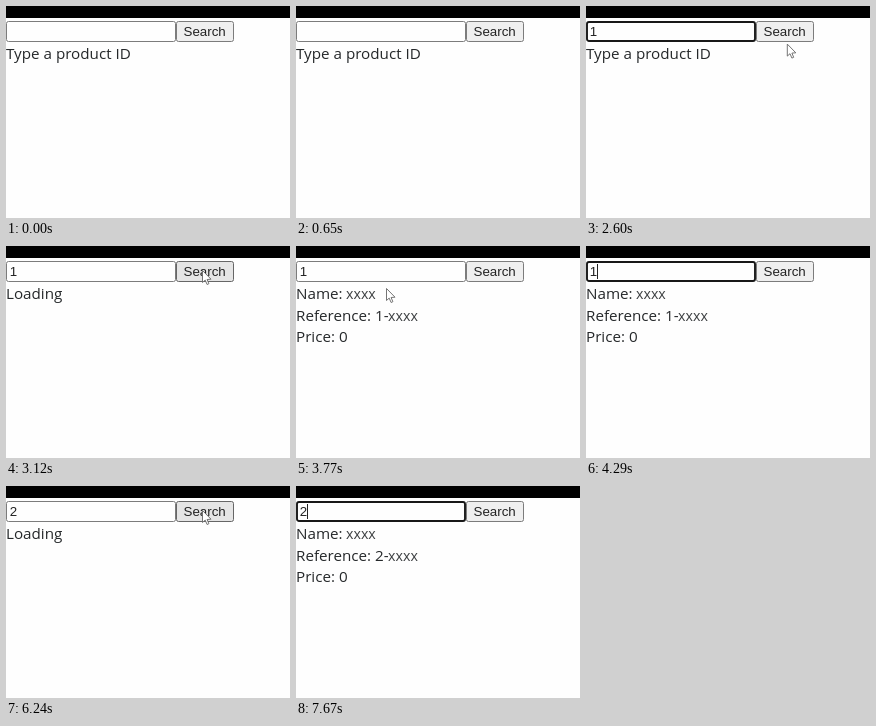
Recreate the animation shown at these times as an HTML page with a canvas. Size 284x212 px, loop 8000 ms.

```html
<!DOCTYPE html>
<html lang="en">
<head>
<meta charset="utf-8">
<title>Product search</title>
<style>
  html, body { margin: 0; width: 100%; height: 100%; overflow: hidden; background: #fefefe; }
  canvas { display: block; width: 284px; height: 212px; }
</style>
</head>
<body>
<canvas id="stage"></canvas>
<script>
const W = 284, H = 212, LOOP = 8000, STEP = 130;
const LOAD = 520, BLINK = 520, APPROACH = 650, CLEAR = 390;
const canvas = document.getElementById('stage');
const dpr = window.devicePixelRatio || 1;
canvas.width = W * dpr;
canvas.height = H * dpr;
const ctx = canvas.getContext('2d');

const PAGE_FONT = '15.2px "Open Sans", sans-serif';
const VALUE_FONT = '14.2px "Open Sans", sans-serif';
const FORM_FONT = '13.333px "Liberation Sans", Arial, sans-serif';
const INK = '#25282a', FORM_INK = '#222', BORDER = '#7c7c7c';

const point = (x, y) => ({ x, y });
const TARGET = point(196, 24), FIELD = point(50, 30);

// The last visit only focuses the field
const searches = [
  { id: '1', focus: 1040, type: 1820, click: 2860, leave: 780,
    from: point(166, 37), bend: point(216, 48) },
  { id: '2', focus: 4290, type: 5070, click: 6240, leave: 260,
    from: point(170, 14), bend: point(184, 18) },
  { id: '2', focus: 7540, type: Infinity, click: Infinity }
];

// Quadratic curve from a to c, bent towards b
function curve(a, b, c, k) {
  const mix = axis => (1 - k) ** 2 * a[axis] + 2 * k * (1 - k) * b[axis] + k * k * c[axis];
  return point(mix('x'), mix('y'));
}

function pointerAt(t) {
  const enter = searches[0].focus - 260;
  if (t >= enter && t < searches[0].focus)
    return curve(point(120, 78), point(112, 50), FIELD, (t - enter) / 260);
  const s = searches.find(({ click, leave }) => t >= click - APPROACH && t < click + LOAD + leave);
  if (!s) return null;
  if (t < s.click) return curve(s.from, s.bend, TARGET, 1 - (s.click - t) / APPROACH);
  const k = Math.max(0, (t - s.click - LOAD) / s.leave);
  return curve(TARGET, point(57, 57), FIELD, k);
}

function formAt(t) {
  const i = searches.findLastIndex(s => s.focus <= t);
  if (i < 0) return { value: '', focused: false, age: 0 };
  const { id, focus, type, click } = searches[i];
  const previous = i ? searches[i - 1].id : '';
  const value = t >= type ? id : t >= type - CLEAR ? '' : previous;
  const lastKey = [focus, type - CLEAR, type].filter(k => k <= t).pop();
  return { value, focused: t < click, age: t - lastKey };
}

function text(str, x, y, font = PAGE_FONT, color = INK) {
  ctx.font = font;
  ctx.fillStyle = color;
  ctx.fillText(str, x, y);
  return x + ctx.measureText(str).width;
}

function box(x, y, w, h, fill, stroke, line) {
  ctx.beginPath();
  ctx.roundRect(x, y, w, h, 2);
  ctx.fillStyle = fill;
  ctx.fill();
  ctx.strokeStyle = stroke;
  ctx.lineWidth = line;
  ctx.stroke();
}

function field({ value, focused, age }) {
  if (focused) box(1, 16, 168, 19, '#fefefe', '#181818', 1.9);
  else box(0.5, 15.5, 169, 20, '#fefefe', BORDER, 1);
  text(value, 3.7, 30, FORM_FONT, FORM_INK);
  if (focused && age % (2 * BLINK) < BLINK) {
    ctx.fillStyle = FORM_INK;
    ctx.fillRect(value ? 11 : 4, 18, 1, 15);
  }
}

function button(hover) {
  box(170.5, 15.5, 57, 20, hover ? '#e5e5e5' : '#efefef', hover ? '#666' : BORDER, 1);
  text('Search', 177.5, 29.5, FORM_FONT, FORM_INK);
}

function masked(label, y) {
  text('xxxx', text(label, 0, y) - 0.5, y, VALUE_FONT, '#3c3f41');
}

function page(t) {
  const result = searches.findLast(s => t >= s.click + LOAD);
  if (searches.some(s => t >= s.click && t < s.click + LOAD)) text('Loading', 0, 53);
  else if (!result) text('Type a product ID', 0, 53);
  else {
    masked('Name: ', 53);
    masked('Reference: ' + result.id + '-', 74.7);
    text('Price: 0', 0, 96);
  }
}

function arrow({ x, y }) {
  ctx.save();
  ctx.translate(x + 0.5, y + 0.5);
  const shape = new Path2D('M0 0V12L2.7 9.6 4.6 14 6.4 13.2 4.6 9 8.5 8.7Z');
  ctx.fillStyle = '#fff';
  ctx.fill(shape);
  ctx.strokeStyle = '#666';
  ctx.lineWidth = 0.9;
  ctx.stroke(shape);
  ctx.restore();
}

const inRow = (p, left, right) => p.x >= left && p.x < right && p.y >= 15 && p.y < 36;

function draw(now) {
  const t = Math.floor((now % LOOP) / STEP) * STEP;
  const pointer = pointerAt(t);

  ctx.setTransform(dpr, 0, 0, dpr, 0, 0);
  ctx.fillStyle = '#fefefe';
  ctx.fillRect(0, 0, W, H);
  ctx.fillStyle = '#000';
  ctx.fillRect(0, 0, W, 12);
  field(formAt(t));
  button(pointer && inRow(pointer, 170, 228));
  page(t);
  // No arrow is shown over the text field
  if (pointer && !inRow(pointer, 0, 170)) arrow(pointer);
}

const begin = performance.now();
function tick() {
  draw(performance.now() - begin);
  requestAnimationFrame(tick);
}
tick();
</script>
</body>
</html>
```
